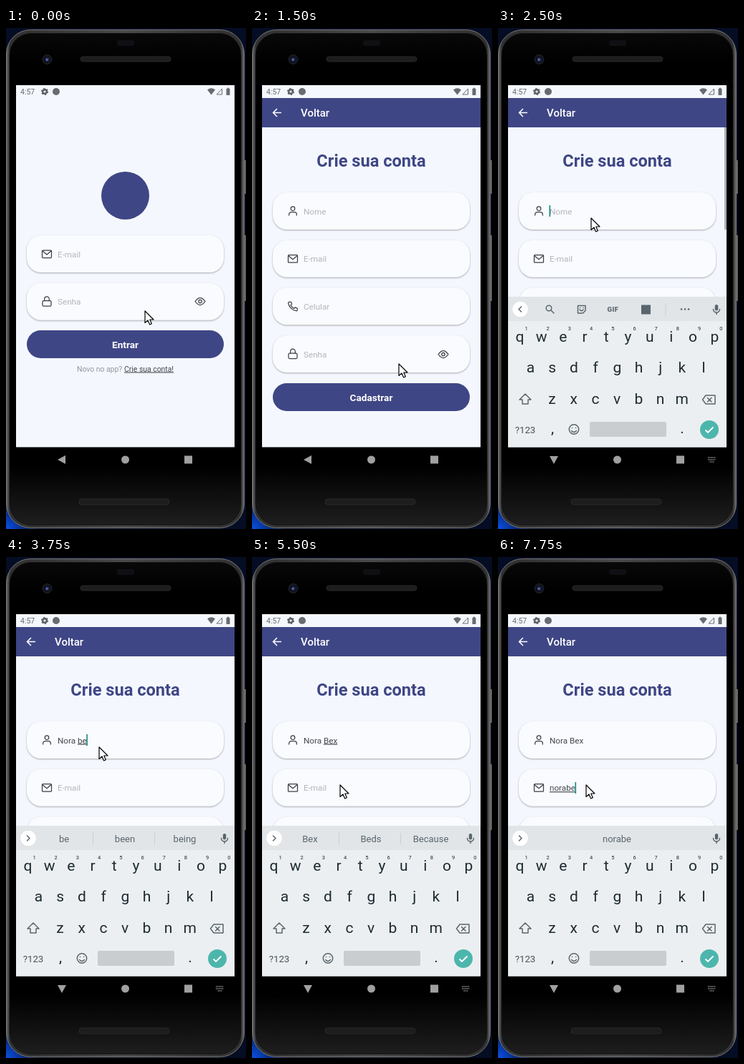
An HTML page that plays this animation: 335 px wide and 701 px high, repeating every 8 s.

```html
<!DOCTYPE html>
<html lang="pt">
<head>
<meta charset="utf-8">
<style>
  html, body { margin: 0; width: 100%; height: 100%; overflow: hidden; background: #050d24; }
  svg { display: block; width: 335px; height: 701px; font-family: Roboto, sans-serif; }
  text { white-space: pre; }
  .mid { text-anchor: middle; }
  .field { font-size: 11.7px; }
  .line { fill: none; stroke: #3c3f45; stroke-width: 1.25; stroke-linecap: round; stroke-linejoin: round; }
  .tool { fill: none; stroke: #5a666d; stroke-width: 1.5; stroke-linecap: round; stroke-linejoin: round; }
  .card { fill: #f9fbfe; filter: drop-shadow(0 1px 1.3px rgba(0, 0, 0, .32)); }
  .bold { font-weight: 700; font-size: 13.6px; fill: #fff; text-anchor: middle; }
</style>
</head>
<body>
<svg viewBox="0 0 335 701">
  <defs>
    <linearGradient id="rim" x2="1" y2="0">
      <stop offset="0" stop-color="#6a6a6a"/><stop offset=".015" stop-color="#303030"/>
      <stop offset=".5" stop-color="#4a4a4a"/><stop offset=".985" stop-color="#303030"/><stop offset="1" stop-color="#6a6a6a"/>
    </linearGradient>
    <linearGradient id="body" x2="0" y2="1">
      <stop offset="0" stop-color="#080808"/><stop offset=".06" stop-color="#000"/>
      <stop offset=".88" stop-color="#000"/><stop offset="1" stop-color="#1e1e1e"/>
    </linearGradient>
    <radialGradient id="glow" cx="0" cy="1" r="1">
      <stop offset="0" stop-color="#0a50e6"/><stop offset="1" stop-color="#050d24"/>
    </radialGradient>
    <clipPath id="screen"><path d="M14 80H319V586.5H14Z"/></clipPath>
    <g id="mail"><rect class="line" x="-6.5" y="-5" width="13" height="10.5" rx="1"/><path class="line" d="M-6-4L0 1L6-4"/></g>
    <g id="lock"><rect class="line" x="-6" y="-1" width="12" height="7.5" rx="1.5"/><path class="line" d="M-3.3-1V-3.5a3.3 3.3 0 0 1 6.6 0V-1"/></g>
    <g id="user"><circle class="line" cy="-3.3" r="2.8"/><path class="line" d="M-5.3 6V4.6a3 3 0 0 1 3-3H2.3a3 3 0 0 1 3 3V6"/></g>
    <path id="phone" class="line" d="M-2.5-6H-5a1.4 1.4 0 0 0-1.4 1.6A13 13 0 0 0 4.7 6.4 1.4 1.4 0 0 0 6.3 5V3L3.2 1.6 1.5 3.1A9 9 0 0 1-3-1.5L-1.4-3.2Z"/>
    <g id="eye"><path class="line" d="M-7 0Q0-10 7 0Q0 10-7 0Z"/><circle class="line" r="2.2"/></g>
  </defs>

  <rect width="335" height="701" fill="#050d24"/>
  <rect y="655" width="46" height="46" fill="url(#glow)"/>
  <path d="M332 185h3v47h-3zM332 290h3v92h-3zM0 190h2v10h-2z" fill="#606060"/>
  <rect x=".5" y="2.5" width="332" height="697" rx="34" fill="url(#rim)" stroke="#777"/>
  <rect x="5" y="7.500" width="323" height="688" rx="30" fill="url(#body)" stroke="#151515"/>
  <rect x="155" y="17" width="24" height="8" rx="3" fill="#101014"/>
  <rect x="104" y="40" width="126" height="7" rx="3.5" fill="#1d1d1d" stroke="#292929"/>
  <rect x="102" y="659" width="126" height="8" rx="4" fill="#1d1d1d" stroke="#292929"/>
  <circle cx="57.5" cy="44" r="6.5" fill="#11131c" stroke="#25262c"/>
  <circle cx="57.5" cy="44" r="2.6" fill="#28356e"/>
  <circle cx="57" cy="44.500" r="1" fill="#8f9ee0"/>

  <g clip-path="url(#screen)">
    <path d="M14 80H319V587H14Z" fill="#f4f8fe"/>
    <g id="login">
      <circle cx="166.5" cy="234.5" r="33.5" fill="#3f4685"/>
      <g id="loginFields"></g>
      <use href="#eye" x="271" y="382.5"/>
      <rect x="29" y="423" width="275" height="39" rx="19.5" fill="#3f4685"/>
      <text class="bold" x="166.5" y="447.5">Entrar</text>
      <text x="99" y="480.5" font-size="10.4" fill="#94979d">Novo no app?</text>
      <text id="link" x="165" y="480.5" font-size="10.4" fill="#44474d" text-decoration="underline">Crie sua conta!</text>
    </g>
    <g id="register">
      <path d="M14 98H319V139H14Z" fill="#3f4685"/>
      <path d="M41 118.5H30M35 113L29.5 118.5L35 124" fill="none" stroke="#fff" stroke-width="1.5"/>
      <text x="68" y="124" font-size="15" font-weight="500" fill="#fff">Voltar</text>
      <text class="mid" x="166.5" y="194" font-size="23.6" font-weight="700" fill="#3f4685">Crie sua conta</text>
      <g id="registerFields"></g>
      <use href="#eye" x="267" y="456.5"/>
      <rect x="29" y="497" width="275" height="39" rx="19.5" fill="#3f4685"/>
      <text class="bold" x="166.5" y="521.5">Cadastrar</text>
      <rect id="scrollbar" x="316" y="139" width="3" height="143" fill="#a9adb3"/>
      <rect id="caret" width="1.6" height="16" fill="#16897f"/>
    </g>
    <g fill="#686b70">
      <text x="20" y="93" font-size="10.5">4:57</text>
      <circle cx="54" cy="89" r="2.8" fill="none" stroke="#5c5f64" stroke-width="2.4"/>
      <circle cx="54" cy="89" r="4.3" fill="none" stroke="#5c5f64" stroke-width="1.5" stroke-dasharray="2.2 2.3"/>
      <circle cx="70" cy="89" r="5"/>
      <path d="M281 86.5Q286.5 82 292 86.5L286.5 93.5Z"/>
      <path d="M294 93L301.5 85V93Z" fill="none" stroke="#686b70"/>
      <path d="M307.5 85h1.2v-1.3h2.6v1.3h1.2v9h-5z"/>
    </g>
    <g id="keyboard">
      <path d="M14 376H319V587H14Z" fill="#eceff1"/>
      <path d="M14 376H319V410H14Z" fill="#e1e5e8"/>
      <circle cx="31" cy="393.5" r="11" fill="#fff" filter="drop-shadow(0 .5px .5px #0003)"/>
      <path id="chevron" class="tool"/>
      <g id="toolbar" class="tool">
        <circle cx="71" cy="392" r="3.8"/><path d="M74 395L78 399"/>
        <path d="M111.5 388.5h10.5v7l-3.5 3.5h-7zM114 394q2.5 3.5 5 0M114.5 391.5h.1M119 391.5h.1"/>
        <text class="mid" x="160.5" y="397" font-size="9.5" font-weight="900" fill="#5a666d" stroke="none" letter-spacing=".5">GIF</text>
        <rect x="200" y="387.5" width="13" height="13" fill="#5a666d" stroke="none"/>
        <path d="M234 386V402" stroke="#c9ced1" stroke-width="1"/>
        <path d="M256 393.5h.1M261 393.5h.1M266 393.5h.1" stroke-width="2.6"/>
      </g>
      <g id="suggestions" class="mid" font-size="13" fill="#5a666d">
        <path id="dividers" d="M121.5 386V402M207.5 386V402" stroke="#c9ced1"/>
        <text x="81" y="398.5"></text><text x="166" y="398.5"></text><text x="249.5" y="398.5"></text>
      </g>
      <rect x="302.8" y="387" width="4.4" height="8.5" rx="2.2" fill="#5a666d"/>
      <path class="tool" d="M300.5 393.5a4.5 4.5 0 0 0 9 0M305 398V400.5"/>
      <g id="keys" class="mid" fill="#1d2b32"></g>
      <path class="tool" d="M38 512L46 520H42V526H34V520H30Z"/>
      <path class="tool" d="M290 514H303V526H290L285.5 520ZM292.5 517.5L298 523M298 517.5L292.5 523"/>
      <text class="mid" x="38" y="566.5" font-size="13.3" fill="#46535a">?123</text>
      <circle class="tool" cx="106" cy="561.5" r="6.7"/>
      <path class="tool" d="M102.5 563.5q3.5 4 7 0M103.5 559.5h.1M108.5 559.5h.1"/>
      <rect x="128" y="551" width="107" height="21" rx="2" fill="#c9cdd0"/>
      <circle cx="295" cy="562" r="13" fill="#4db6ac"/>
      <path d="M289.5 562.5L293 566L300.5 558.5" fill="none" stroke="#fff" stroke-width="1.8"/>
    </g>
  </g>

  <g fill="#a0a0a0">
    <path id="back"/>
    <circle cx="166.5" cy="604" r="5.5"/>
    <rect x="249" y="598.5" width="11" height="11"/>
    <path id="imeIcon" d="M293 601H304M293 604H304M295.5 607H301.5" stroke="#909090" stroke-width="1.4" stroke-dasharray="1.4 .8"/>
  </g>
  <path id="cursor" d="M0 0V16.5L4 13L6.6 19L9.3 17.8L6.8 12H12Z" fill="#fff" stroke="#000" stroke-width="1.2" stroke-linejoin="round"/>
</svg>
<script>
const $ = id => document.getElementById(id);
const LOOP = 8000, STEP = 250;

function addFields(group, top, fields) {
  $(group).innerHTML = fields.map(([icon, label], i) => {
    const y = top + i * 66.67;
    return `<rect class="card" x="29" y="${y}" width="275" height="52" rx="20"/>
      <use href="#${icon}" x="57" y="${y + 26}"/>
      <text class="field" x="72" y="${y + 30.5}" fill="#b2b5ba">${label}</text>`;
  }).join('');
}
addFields('loginFields', 290, [['mail', 'E-mail'], ['lock', 'Senha']]);
addFields('registerFields', 230, [['user', 'Nome'], ['mail', 'E-mail'], ['phone', 'Celular'], ['lock', 'Senha']]);

const key = (x, y, char, size = 21) => `<text x="${x}" y="${y}" font-size="${size}">${char}</text>`;
const row = (chars, x, y) => [...chars].map((c, i) => key(x + i * 30.2, y, c)).join('');
$('keys').innerHTML = row('qwertyuiop', 30.5, 439) + row('asdfghjkl', 45.5, 482) + row('zxcvbnm', 75.5, 526)
  + [...'1234567890'].map((c, i) => key(39.5 + i * 30.2, 423, c, 7.5)).join('')
  + key(76, 567, ',') + key(257, 567, '.');

// Each track lists [start time, value]; a value holds until the next one.
const pointer = [[0, [194, 396]], [250, [198, 412]], [500, [204, 445]], [750, [208, 472]], [1000, [209, 480]],
  [1500, [205, 470]], [1750, [178, 400]], [2000, [144, 305]], [2250, [130, 266]], [5250, [126, 298]], [5500, [123, 319]]];
const nameTyped = [[0, ''], [3000, 'N'], [3250, 'Nor'], [3500, 'Nora '], [3750, 'Nora be'], [4000, 'Nora b'],
  [4250, 'Nora '], [4500, 'Nora B'], [4750, 'Nora Be'], [5000, 'Nora Bex']];
const mailTyped = [[0, ''], [6250, 'n'], [6500, 'no'], [6750, 'nora'], [7500, 'norab'], [7750, 'norabe']];
const hints = [[0, null], [3000, ['N', 'No', 'Na']], [3250, ['Nor', 'Not', 'North']], [3500, ['and', 'is', 'the']],
  [3750, ['be', 'been', 'being']], [4000, ['b', 'be', 'by']], [4250, ['and', 'is', 'the']], [4500, ['B', 'But', 'By']],
  [4750, ['Be', 'Been', 'Being']], [5000, ['Bex', 'Beds', 'Because']], [5750, null], [6250, ['n', 'no', 'not']],
  [6500, ['no', 'not', 'now']], [6750, ['', 'nora', '']], [7500, ['', 'norab', '']], [7750, ['', 'norabe', '']]];
const at = (track, t) => track.findLast(([start]) => start <= t)[1];

const show = (id, on) => $(id).style.display = on ? '' : 'none';
const [nameText, mailText] = $('registerFields').querySelectorAll('text');
const hintTexts = $('suggestions').querySelectorAll('text');

function setField(el, value, label, focused) {
  const split = value.lastIndexOf(' ') + 1;
  el.setAttribute('fill', value ? '#45484e' : '#b2b5ba');
  el.innerHTML = value
    ? `${value.slice(0, split)}<tspan text-decoration="${focused ? 'underline' : 'none'}">${value.slice(split)}</tspan>`
    : label;
}

function render(t) {
  const registering = t >= 1500, typing = t >= 2500, onMail = t >= 5750;
  show('login', !registering);
  show('register', registering);
  show('keyboard', typing);
  show('imeIcon', typing);
  show('scrollbar', typing && t < 2750);
  $('link').style.opacity = t >= 1250 ? .28 : 1;
  $('back').setAttribute('d', typing ? 'M72 599H84L78 610Z' : 'M83 598V610L72 604Z');

  const name = at(nameTyped, t), mail = at(mailTyped, t);
  setField(nameText, name, 'Nome', !onMail);
  setField(mailText, mail, 'E-mail', true);
  const [field, value] = onMail ? [mailText, mail] : [nameText, name];
  show('caret', typing && !(t >= 5250 && t < 5750));
  if (registering) $('caret').setAttribute('x', 71.5 + (value ? field.getComputedTextLength() : 0));
  $('caret').setAttribute('y', onMail ? 315 : 248);

  const words = at(hints, t);
  show('toolbar', !words);
  show('suggestions', words);
  show('dividers', words && words[0]);
  hintTexts.forEach((el, i) => el.textContent = words ? words[i] : '');
  $('chevron').setAttribute('d', words ? 'M29.5 390L33 393.5L29.5 397' : 'M32.5 390L29 393.5L32.5 397');
  $('cursor').setAttribute('transform', `translate(${at(pointer, t)})`);
}

let shown = -1;
const origin = performance.now();
function tick() {
  const t = Math.floor((performance.now() - origin) % LOOP / STEP) * STEP;
  if (t !== shown) render(shown = t);
  requestAnimationFrame(tick);
}
tick();
</script>
</body>
</html>
```
